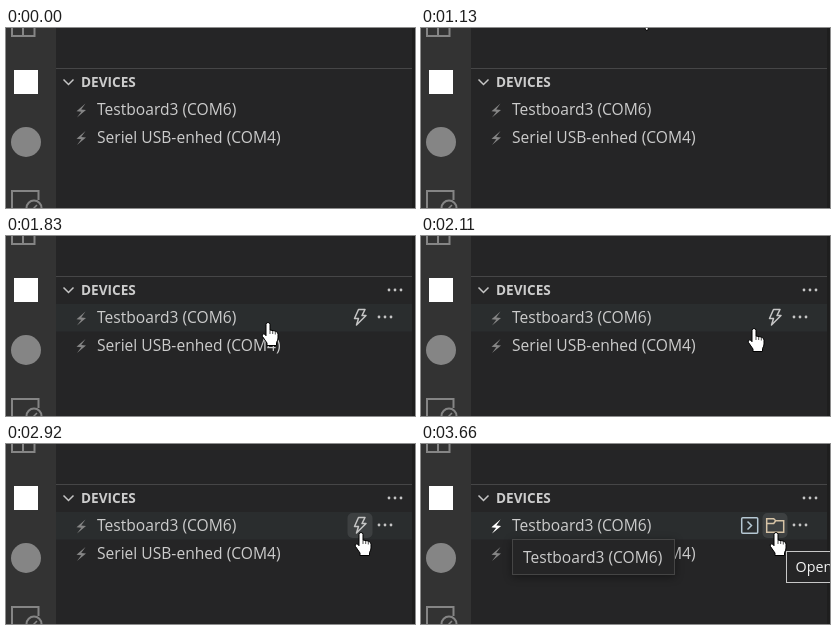
Animation of 409 by 180 pixels, one loop 5.71 s. Source, as an HTML page:

```html
<!DOCTYPE html>
<html lang="da">
<head>
<meta charset="utf-8">
<title>Devices panel</title>
<style>
html, body { margin: 0; width: 100%; height: 100%; overflow: hidden; background: #252526; }
svg { display: block; width: 409px; height: 180px; }
text { font: 15.6px "Open Sans", "Noto Sans", sans-serif; fill: #ccc; }
.title { font-size: 13.6px; font-weight: 700; }
.native { font-size: 14.3px; fill: #f0f0f0; }
.line { fill: none; stroke: #c5c5c5; stroke-width: 1.5; }
.bar { fill: none; stroke: #858585; stroke-width: 2; }
.tip { fill: #252526; stroke: #454545; filter: drop-shadow(0 2px 4px rgba(0, 0, 0, .4)); }
.pointer { fill: #fff; stroke: #000; stroke-linejoin: round; }

.anim { animation: 5710ms step-end infinite; visibility: hidden; }
.more { animation-name: more; }
.hover { animation-name: hover; }
.connect { animation-name: connect; }
.focus { animation-name: focus; }
.hint { animation-name: hint; }
.online { animation-name: online; }
.folder { animation-name: folder; }
.term { animation-name: term; }
.label { animation-name: label; }
.open { animation-name: open; }
.arrow { animation-name: arrow; }
.hand { animation-name: hand; }
.move { animation: move 5710ms step-end infinite; }

@keyframes more {
  0%, 3.32% { visibility: hidden }
  2.27%, 24.69%, 100% { visibility: visible }
}
@keyframes hover { 0% { visibility: hidden } 28.37%, 100% { visibility: visible } }
@keyframes connect { 0%, 53.58%, 100% { visibility: hidden } 28.37% { visibility: visible } }
@keyframes focus { 0% { visibility: hidden } 38.17%, 100% { visibility: visible } }
@keyframes hint { 0%, 51.13%, 100% { visibility: hidden } 40.62% { visibility: visible } }
@keyframes online { 0% { visibility: hidden } 52.36%, 100% { visibility: visible } }
@keyframes folder { 0% { visibility: hidden } 53.58%, 100% { visibility: visible } }
@keyframes term { 0% { visibility: hidden } 54.81%, 100% { visibility: visible } }
@keyframes label { 0% { visibility: hidden } 62.87%, 100% { visibility: visible } }
@keyframes open { 0% { visibility: hidden } 64.09%, 100% { visibility: visible } }
@keyframes arrow { 0%, 24.69%, 100% { visibility: hidden } 19.78% { visibility: visible } }
@keyframes hand { 0% { visibility: hidden } 24.69%, 100% { visibility: visible } }
@keyframes move {
  0%, 19.78% { transform: translate(218px, -17px) }
  21.01% { transform: translate(218px, 2px) }
  22.24% { transform: translate(219px, 18px) }
  23.46% { transform: translate(221px, 32px) }
  24.69% { transform: translate(225px, 44px) }
  25.91% { transform: translate(228px, 53px) }
  27.14% { transform: translate(232px, 60px) }
  28.37% { transform: translate(235px, 70px) }
  29.59% { transform: translate(239px, 80px) }
  30.82% { transform: translate(247px, 84px) }
  32.04% { transform: translate(262px, 87px) }
  33.27% { transform: translate(280px, 89px) }
  34.5% { transform: translate(299px, 91px) }
  35.72% { transform: translate(317px, 92px) }
  36.95% { transform: translate(333px, 93px) }
  38.17% { transform: translate(343px, 93px) }
  39.4% { transform: translate(349px, 92px) }
  40.62% { transform: translate(352px, 92px) }
  41.85% { transform: translate(352px, 91px) }
  44.13% { transform: translate(353px, 91px) }
  45.35% { transform: translate(354px, 90px) }
  46.58%, 100% { transform: translate(355px, 89px) }
}
</style>
</head>
<body>
<svg viewBox="0 0 409 180">
  <defs>
    <path id="bolt" d="M79.5 75.5 70.5 83.3l4.800.5-4.300 5.700 9-7.400-4.800-.7z"/>
    <g id="dots" fill="#c5c5c5">
      <circle r="1.4" cx="-6"/><circle r="1.4"/><circle r="1.4" cx="6"/>
    </g>
  </defs>

  <rect width="406" height="180" fill="#252526"/>
  <rect x="406" width="3" height="180" fill="#1e1e1e"/>
  <rect width="50" height="180" fill="#333"/>
  <g class="bar">
    <path d="M6-2V8H28.500V-2M17-2V8"/>
    <path d="M6 182V163H32.500V172"/>
    <circle cx="28" cy="180" r="7.500"/>
    <path d="m25 183 6-6" stroke-width="1.5"/>
  </g>
  <rect x="8" y="42" width="24" height="24" fill="#fff"/>
  <circle cx="20" cy="114" r="15" fill="#858585"/>

  <path d="M50 40.5H406" stroke="#464647"/>
  <path class="line" d="m57.5 51.5 5 5 5-5"/>
  <text class="title" x="75" y="59">DEVICES</text>
  <g class="anim more"><use href="#dots" x="389" y="54"/></g>

  <rect class="anim hover" x="50" y="68" width="356" height="27.5" fill="#2a2d2e"/>
  <use href="#bolt" fill="#858585"/>
  <use class="anim online" href="#bolt" fill="#fff"/>
  <text x="91" y="87">Testboard3 (COM6)</text>
  <use href="#bolt" y="27.5" fill="#858585"/>
  <text x="91" y="115">Seriel USB-enhed (COM4)</text>

  <rect class="anim focus" x="341.5" y="69" width="25" height="25" rx="5" fill="#5a5d5e" fill-opacity=".4"/>
  <path class="anim connect line" d="M352.5 73.5h6.5l-3 6h4l-9.5 9.5 2-6.5h-4z" stroke-linejoin="round"/>
  <g class="anim term line" style="stroke:#b5c8d3">
    <rect x="320.7" y="73.7" width="16" height="15.5" rx="1"/>
    <path d="m326.5 77.5 4 4-4 4"/>
  </g>
  <path class="anim folder line" style="stroke:#d6c3a6" d="M345.7 88.3V74.7h7l2 2h8v11.6zM345.7 79.5h7l2-2.800"/>
  <g class="anim hover"><use href="#dots" x="379" y="81"/></g>

  <g class="anim hint">
    <rect class="tip" x="343.5" y="96.5" width="163" height="34"/>
    <text x="354" y="119">Testboard3 (COM6)</text>
  </g>
  <g class="anim label">
    <rect class="tip" x="91.5" y="95.5" width="162" height="35"/>
    <text x="102" y="119">Testboard3 (COM6)</text>
  </g>
  <g class="anim open">
    <rect x="365.5" y="107.5" width="80" height="31" fill="#252526" stroke="#c8c8c8"/>
    <text class="native" x="374.5" y="128">Open</text>
  </g>

  <g class="move">
    <path class="anim arrow pointer" d="M.5.5V16.5L4.300 13l2.700 6.500 2.600-1L7 12h5z"/>
    <g class="anim hand pointer">
      <path d="M-2 1.5a2 2 0 0 1 4 0V7l5 1q3 .6 3 3.200V15q0 2-1.500 4.500V22.500H-1V20L-5.500 13.500q-1-2 .5-2.600 1.500-.4 3 1.800z"/>
      <path d="M2 7v4M4.700 8v3M7.300 8.500v3" stroke-width=".7"/>
    </g>
  </g>
</svg>
</body>
</html>
```
